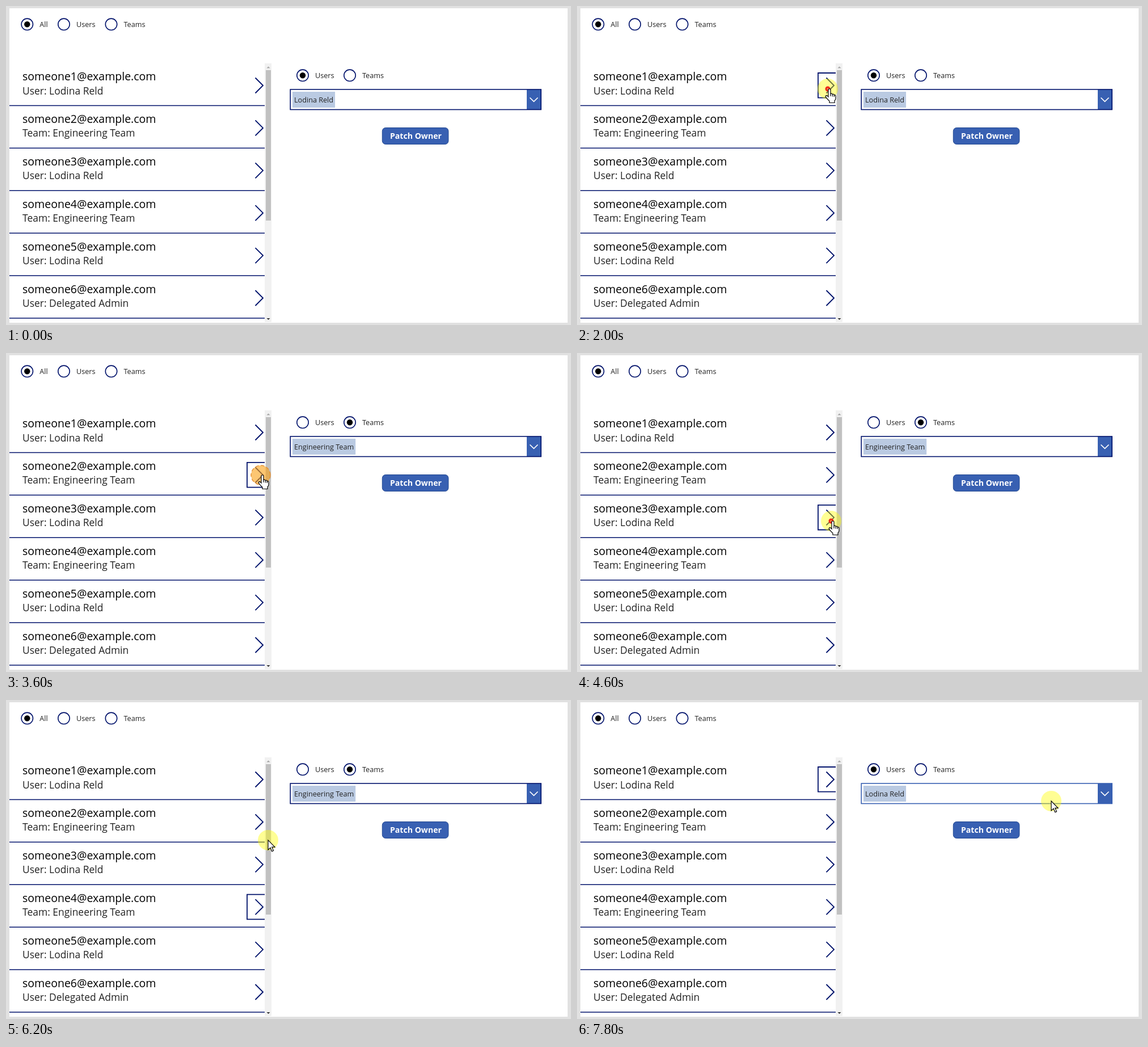
Recreate the animation shown at these times as an HTML page with a canvas. Size 996 by 562 pixels, loop 8000 ms.

```html
<!DOCTYPE html>
<html lang="en">
<head>
<meta charset="utf-8">
<title>Record owner</title>
<style>
  html, body { margin: 0; width: 100%; height: 100%; overflow: hidden; background: #e1e1e1; }
  canvas { display: block; }
</style>
</head>
<body>
<canvas id="stage" width="996" height="562"></canvas>
<script>
const ctx = document.getElementById('stage').getContext('2d', { alpha: false });
const LOOP = 8000, STEP = 200;
const NAVY = '#00126b', BLUE = '#3860b2', INK = '#222';
const ROW_TOP = 101, ROW_H = 74.9;
const USER = 'Lodina Reld', TEAM = 'Engineering Team';
const OWNERS = [USER, TEAM, USER, TEAM, USER, 'Delegated Admin'];

// The pointer glides along one curve per leg, rests, and may click a row.
const ENTRY = { x: 693, y: 357 };
const LEGS = [
  { start: 600, end: 1600, via: { x: 600, y: -60 }, to: { x: 442, y: 146 }, power: 1.75, click: 2000, row: 0 },
  { start: 2800, end: 3200, via: { x: 444, y: 180 }, to: { x: 449, y: 215 }, click: 3400, row: 1 },
  { start: 3600, end: 4200, via: { x: 453, y: 255 }, to: { x: 448, y: 296 }, click: 4600, row: 2 },
  { start: 4800, end: 5600, via: { x: 421, y: 362 }, to: { x: 446, y: 367 }, click: 5800, row: 3 },
  { start: 6000, end: 6600, via: { x: 482, y: 152 }, to: { x: 446, y: 146 }, click: 7000, row: 0 },
  { start: 7200, end: 7800, via: { x: 560, y: 150 }, to: { x: 836, y: 178 } }
];

function box(x, y, w, h, color) {
  ctx.fillStyle = color;
  ctx.fillRect(x, y, w, h);
}

function line(points, color, width) {
  ctx.beginPath();
  points.forEach(([x, y]) => ctx.lineTo(x, y));
  ctx.strokeStyle = color;
  ctx.lineWidth = width;
  ctx.stroke();
}

function disc(x, y, r, color) {
  ctx.beginPath();
  ctx.arc(x, y, r, 0, Math.PI * 2);
  ctx.fillStyle = color;
  ctx.fill();
}

function text(str, x, y, size, color = INK, weight = 400) {
  ctx.font = `${weight} ${size}px "Open Sans", sans-serif`;
  ctx.fillStyle = color;
  ctx.fillText(str, x, y);
}

function radio(x, y, label, checked) {
  ctx.beginPath();
  ctx.arc(x, y, 10.2, 0, Math.PI * 2);
  ctx.strokeStyle = NAVY;
  ctx.lineWidth = 1.6;
  ctx.stroke();
  if (checked) disc(x, y, 5.2, '#000');
  text(label, x + 22, y + 4.2, 12.65);
}

function triangle(x, y, dir, color) {
  ctx.beginPath();
  ctx.moveTo(x - 3, y - dir * 1.5);
  ctx.lineTo(x + 3, y - dir * 1.5);
  ctx.lineTo(x, y + dir * 1.5);
  ctx.fillStyle = color;
  ctx.fill();
}

function gallery(selected) {
  OWNERS.forEach((owner, i) => {
    const y = ROW_TOP + i * ROW_H;
    const kind = owner === TEAM ? 'Team' : 'User';
    text(`someone${i + 1}@example.com`, 29, y + 30.3, 19.5, '#000', 500);
    text(`${kind}: ${owner}`, 29, y + 54.5, 17.45);
    line([[439.5, y + 25.5], [453, y + 39], [439.5, y + 52.5]], NAVY, 1.9);
    if (i === selected) {
      const top = y + 17;
      line([[456.5, top], [425, top], [425, top + 43.7], [456.5, top + 43.7]], NAVY, 1.8);
    }
    box(6, y + 73.7, 450, 1.5, NAVY);
  });
  box(456, 101, 12, 456, '#f1f1f1');
  box(458, 113, 9, 265, '#c1c1c1');
  triangle(462.5, 108, -1, '#a3a3a3');
  triangle(462.5, 551.5, 1, '#333');
}

function ownerPanel(isTeam, hovered) {
  const name = isTeam ? TEAM : USER;
  radio(523, 122.3, 'Users', !isTeam);
  radio(606, 122.3, 'Teams', isTeam);

  ctx.font = '400 12.65px "Open Sans", sans-serif';
  box(505, 151, ctx.measureText(name).width + 6, 28, '#bacae2');
  text(name, 508, 169.5, 12.65);
  box(918, 147, 25, 35, BLUE);
  line([[923.5, 161.5], [930.5, 168.3], [937.5, 161.5]], '#fff', 1.7);
  ctx.strokeStyle = hovered ? BLUE : NAVY;
  ctx.lineWidth = 1.6;
  ctx.strokeRect(501.2, 147, 442, 35.5);

  ctx.beginPath();
  ctx.roundRect(663.3, 214.5, 116.6, 29, 6);
  ctx.fillStyle = BLUE;
  ctx.fill();
  ctx.strokeStyle = '#1f4590';
  ctx.lineWidth = 1;
  ctx.stroke();
  text('Patch Owner', 677, 234, 14.1, '#fff', 700);
}

function pointerAt(t) {
  const index = LEGS.findLastIndex(leg => leg.start <= t);
  if (index < 0) return null;
  const { start, end, via, to, power = 1 } = LEGS[index];
  const from = index ? LEGS[index - 1].to : ENTRY;
  const k = Math.min(1, (t - start) / (end - start)) ** power;
  const curve = axis => (1 - k) ** 2 * from[axis] + 2 * k * (1 - k) * via[axis] + k * k * to[axis];
  return { x: curve('x'), y: curve('y') };
}

const ARROW = new Path2D('M0 0V17L4 13.3L6.8 19.8L9.5 18.6L6.8 12.3H12Z');
const HAND = new Path2D('M1 14V2Q1 0 3 0Q5 0 5 2V8.5Q7.5 7.5 8.3 9.5Q10.7 8.6 11.3 10.7' +
  'Q14 10.2 14 13V17Q14 19 12 21V24.5H3V21.5Q0 19 -3.7 14.2Q-4.2 11.8 -2 11.7Q-.5 12 1 14Z');
const KNUCKLES = new Path2D('M5 8.5V13M8.3 9.5V13.5M11.3 10.7V14');

function pointer({ x, y }, clickAge) {
  const overChevron = x > 422 && x < 457 && (y - ROW_TOP - 16 + ROW_H) % ROW_H < 46;
  if (clickAge === STEP) {
    disc(x, y, 17, 'rgba(250,160,20,.6)');
    ctx.setLineDash([6, 4]);
    ctx.strokeStyle = '#e39035';
    ctx.lineWidth = 1.4;
    ctx.stroke();
    ctx.setLineDash([]);
  } else {
    disc(x, y, 18, 'rgba(255,252,0,.42)');
    if (clickAge === 0) {
      disc(x, y, 4.5, '#f02a18');
      disc(x, y, 1.5, '#f79a55');
    }
  }
  ctx.save();
  ctx.translate(x, y);
  ctx.fillStyle = '#fff';
  ctx.strokeStyle = '#000';
  ctx.lineWidth = 1.2;
  const shape = overChevron ? HAND : ARROW;
  ctx.fill(shape);
  ctx.stroke(shape);
  if (overChevron) ctx.stroke(KNUCKLES);
  ctx.restore();
}

function draw(t) {
  const clicked = LEGS.findLast(leg => leg.click <= t);
  const loaded = LEGS.findLast(leg => leg.click + STEP <= t);
  const spot = pointerAt(t);
  const hovered = Boolean(spot) && spot.x > 501 && spot.y > 147 && spot.y < 183;

  box(0, 0, 996, 562, '#e1e1e1');
  box(6, 4, 984, 554, '#fff');
  radio(37.3, 32.3, 'All', true);
  radio(102, 32.3, 'Users', false);
  radio(185.5, 32.3, 'Teams', false);
  gallery(clicked?.row);
  ownerPanel(Boolean(loaded) && OWNERS[loaded.row] === TEAM, hovered);
  if (spot) pointer(spot, clicked ? t - clicked.click : -1);
}

// The screen refreshes five times a second.
function tick() {
  draw(Math.floor(performance.now() % LOOP / STEP) * STEP);
  requestAnimationFrame(tick);
}
tick();
</script>
</body>
</html>
```
